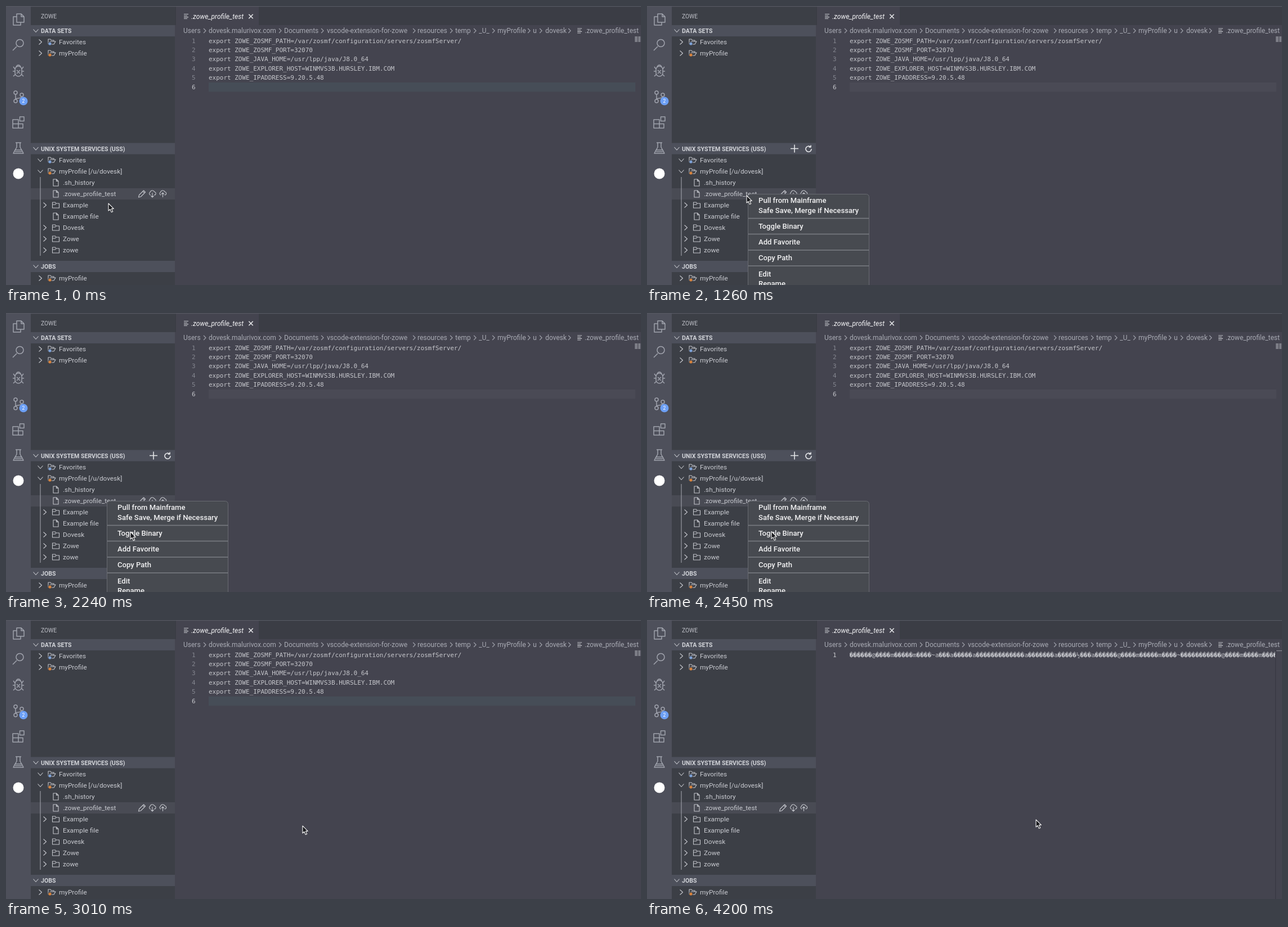
These frames come from a looping animation (1128 px wide and 496 px high, 4270 ms). An HTML page:

```html
<!DOCTYPE html>
<html lang="en">
<head>
<meta charset="utf-8">
<title>Toggle binary</title>
<style>
html, body { margin: 0; height: 100%; overflow: hidden; background: #44444f; }
svg { display: block; width: 1128px; height: 496px; }
text { font: 11.8px Roboto, sans-serif; fill: #c9cbd1; white-space: pre; }
.crumb { font-size: 12px; fill: #a9abb4; }
.tab { font-size: 12px; font-style: italic; fill: #f4f4f6; }
.head { font-size: 10.6px; font-weight: 700; fill: #d2d4d9; }
.title { font-size: 10.3px; fill: #c0c2c9; }
.menu { font-size: 13.1px; font-weight: 500; fill: #f2f2f3; }
.badge { font-size: 8.5px; fill: #fff; text-anchor: middle; }
.code { font: 10.98px "DejaVu Sans Mono", monospace; fill: #c6c7cc; }
.num { fill: #858790; }
path { fill: none; stroke: #c3c5cb; stroke-width: 1.1; stroke-linejoin: round; }
.bar path { stroke: #a0a3ad; stroke-width: 1.5; }
.dim { stroke: #a0a2ab; }
.bright { stroke: #e4e5e8; stroke-width: 1.6; }
</style>
</head>
<body>
<svg viewBox="0 0 1128 496" xmlns="http://www.w3.org/2000/svg"></svg>
<script>
const svg = document.querySelector('svg');
const user = 'dovesk';

const rect = (x, y, w, h, fill, extra = '') =>
  `<rect x="${x}" y="${y}" width="${w}" height="${h}" fill="${fill}" ${extra}/>`;
const text = (x, y, s, cls = '') => `<text x="${x}" y="${y}" class="${cls}">${s}</text>`;
const path = (x, y, d, cls = '') => `<path transform="translate(${x} ${y})" d="${d}" class="${cls}"/>`;
const dot = (x, y, r, fill) => `<circle cx="${x}" cy="${y}" r="${r}" fill="${fill}"/>`;
const group = (id, body) => `<g id="${id}">${body}</g>`;

const RIGHT = 'M-2.5 -4.5L2.5 0L-2.5 4.5', DOWN = 'M-4.5 -2.5L0 2.5L4.5 -2.5';
const FILE = 'M-4.5 -6H1L4.5 -2.5V6H-4.5ZM1 -6V-2.5H4.5';
const FOLDER = 'M-6 5V-5H-1L0.5 -3H6V5ZM-6 -1H-1L0.5 -3';
const OPEN = 'M-6 4V-5H-2L-0.5 -3H4V-1M-2 4H4L7 -1H-2.5L-6 4';
const LINES = 'M-4 -4H4M-4 -1.3H2M-4 1.4H4M-4 4H2';
const CLOUD = 'M-3 3H-3.8A2.8 2.8 0 0 1 -4 -2A4 4 0 0 1 3.6 -2.5A2.8 2.8 0 0 1 4 3H3';

const header = (y, s) =>
  rect(44, y - 10, 256, 20, '#4d505b') + path(53, y, DOWN) + text(62, y + 4, s, 'head');

function profile(y, label, color, chevron) {
  return path(61, y, chevron) + path(81, y, OPEN) + dot(78, y + 3, 3.4, '#3c3f46') +
    dot(78, y + 3, 2.6, color) + text(94, y + 4, label);
}

function entry(y, label, isFolder) {
  return (isFolder ? path(69, y, RIGHT) : '') +
    path(88.5, y, isFolder ? FOLDER : FILE) + text(101, y + 4, label);
}

const BLUE = '#7fa3d8', ORANGE = '#d9853f';

const activityBar = '<g class="bar">' + rect(0, 0, 44, 496, '#4e505b') +
  path(22, 24, 'M-3 -10H5L10 -5V5H-3ZM5 -10V-5H10M-3 -5H-9V10H4V5') +
  path(22, 69, 'M-3 3L-10 10M-4 -3A6.5 6.5 0 1 0 9 -3A6.5 6.5 0 1 0 -4 -3') +
  path(22, 115, 'M-6 -2A6 6 0 0 1 6 -2V4A6 6 0 0 1 -6 4ZM-4 -6A4 4 0 0 1 4 -6M-6 1H-10M6 1H10M-6 -3L-9 -7M6 -3L9 -7M-5 6L-9 10M5 6L9 10M-3 -1L3 5M3 -1L-3 5') +
  path(22, 161, 'M-8 -7A3 3 0 1 0 -2 -7A3 3 0 1 0 -8 -7M-8 8A3 3 0 1 0 -2 8A3 3 0 1 0 -8 8M3 -3A3 3 0 1 0 9 -3A3 3 0 1 0 3 -3M-5 -4V5M6 0C6 3 -1 3 -5 4') +
  dot(31, 169, 7.5, '#6c9ff5') + text(31, 172, '2', 'badge') +
  path(22, 207, 'M-10 -5H0V10H-10ZM-10 2.5H8V10H0M0 2.5H8V10M2.5 -10H10V-2.5H2.5Z') +
  path(22, 253, 'M-5 -10H5M-3 -10V-2L-9 9H9L3 -2V-10M-6 3H6L9 9H-9ZM-6 6H6') +
  dot(22, 298, 9.5, '#fff') + '</g>';

const sideBar = rect(44, 0, 256, 496, '#3c3f46') + text(62, 22, 'ZOWE', 'title') +
  header(44, 'DATA SETS') +
  profile(64, 'Favorites', BLUE, RIGHT) + profile(84, 'myProfile', ORANGE, RIGHT) +
  header(253.5, 'UNIX SYSTEM SERVICES (USS)') +
  group('actions',
    path(262, 253.5, 'M-7 0H7M0 -7V7', 'bright') +
    path(287, 254, 'M3.5 -3.4A5 5 0 1 0 5 0M4 -6.5V-3H0.5', 'bright')) +
  rect(44, 324, 256, 20, '#494b54') +
  group('hover', rect(44, 384, 256, 20, '#43434d')) +
  profile(274, 'Favorites', BLUE, DOWN) + profile(294, `myProfile [/u/${user}]`, ORANGE, DOWN) +
  path(61, 304, 'M0 0V140', 'dim') +
  ['.sh_history', '.zowe_profile_test', 'Example', 'Example file', 'D' + user.slice(1), 'Zowe', 'zowe']
    .map((name, i) => entry(314 + 20 * i, name, i == 2 || i > 3)).join('') +
  path(241.5, 334, 'M-6 6L-5 2L3 -6L6 -3L-2 5ZM1.5 -4.5L4.5 -1.5') +
  path(260, 333, CLOUD + 'M0 -1V7M-2.5 4.5L0 7L2.5 4.5') +
  path(278.5, 333, CLOUD + 'M0 7V-1M-2.5 1.5L0 -1L2.5 1.5') +
  header(463, 'JOBS') + profile(484, 'myProfile', ORANGE, RIGHT);

const crumbs = [[315, 'Users'], [360, user + '.malurivox.com'], [494, 'Documents'],
  [570, 'vscode-extension-for-zowe'], [731, 'resources'], [798, 'temp'], [840, '_U_'],
  [873, 'myProfile'], [936, 'u'], [958, user], [1028, '.zowe_profile_test']];

const codeLine = (i, s) => text(360, 65.5 + 16.45 * i, s, 'code');
const lineNumber = (i, active) => text(330, 65.5 + 16.45 * i, i + 1, active ? 'code' : 'code num');

const script = ['ZOSMF_PATH=/var/zosmf/configuration/servers/zosmfServer/', 'ZOSMF_PORT=32070',
  'JAVA_HOME=/usr/lpp/java/J8.0_64', 'EXPLORER_HOST=WINMVS3B.HURSLEY.IBM.COM', 'IPADDRESS=9.20.5.48'];

// Digits stand for runs of undecodable characters.
const binary = '6@4m5m4~a3a5a99@'.replace('99@', '67a7a5½3a6@') + '4m5m4~56@4m4m4';
const garbled = binary.replace(/\d/g, n => '\ufffd'.repeat(n));

const editor = rect(300, 0, 828, 496, '#44444f') + rect(449, 0, 679, 34, '#3b3d45') +
  rect(300, 0, 2, 34, '#3b3d45') +
  path(320, 18.5, LINES) + text(329, 23, '.zowe_profile_test', 'tab') +
  path(435, 18.5, 'M-3.7 -3.7L3.7 3.7M3.7 -3.7L-3.7 3.7', 'bright') +
  crumbs.map(([x, s]) => text(x, 48, s, 'crumb')).join('') +
  [353, 487, 562, 725, 791, 833, 866, 929, 950, 1001]
    .map(x => path(x, 44, 'M-2 -4L2 0L-2 4', 'dim')).join('') +
  path(1019, 44, LINES) +
  group('plain',
    rect(360, 136, 758, 16.5, '#4a4a55', 'id="line"') +
    script.map((s, i) => lineNumber(i) + codeLine(i, 'export ZOWE_' + s)).join('') +
    lineNumber(5, true) +
    rect(1117, 54, 5, 10, '#7c7d86') + rect(1123, 54, 4, 10, '#7c7d86')) +
  group('binary',
    lineNumber(0, true) +
    `<clipPath id="view"><rect x="360" y="53" width="756.5" height="20"/></clipPath>` +
    `<g clip-path="url(#view)">${codeLine(0, garbled)}</g>` +
    rect(1116, 53, 1.2, 443, '#373842') + rect(1118, 54, 10, 1.2, '#85868e'));

const menuItems = [[350, 'Pull from Mainframe'], [367.5, 'Safe Save, Merge if Necessary'],
  [395.5, 'Toggle Binary'], [424, 'Add Favorite'], [452, 'Copy Path'], [480.5, 'Edit'], [498, 'Rename']];

const menu = group('menu',
  rect(179.5, 334.5, 215, 180, '#474a50', 'rx="5" stroke="#696b72"') +
  [377.5, 405.5, 434, 462].map(y => rect(180, y - 0.8, 214.5, 1.6, '#777a80')).join('') +
  menuItems.map(([y, s]) => text(198, y, s, 'menu')).join(''));

const pointer = group('pointer',
  '<path d="M0 0V13L3 10.3L5.3 15.6L7.7 14.5L5.4 9.4H9.3Z" style="fill:#17181c;stroke:#f4f4f4"/>');

svg.innerHTML = editor + sideBar + activityBar + rect(0, 0, 1128, 1.3, '#555761') + menu + pointer;

const LOOP = 4270, STEP = 70;
const route = [[0, 182, 351], [420, 177, 337], [1400, 177, 337], [1680, 226, 380], [1890, 226, 380],
  [2240, 221, 389], [2590, 221, 388], [3290, 693, 354], [3640, 693, 354], [3920, 691, 355], [LOOP, 691, 355]];

function pointerAt(t) {
  const i = route.findIndex(p => p[0] > t);
  const [t0, x0, y0] = route[i - 1], [t1, x1, y1] = route[i];
  const u = (t - t0) / (t1 - t0), k = u * u * (3 - 2 * u);
  return [x0 + (x1 - x0) * k, y0 + (y1 - y0) * k];
}

const $ = id => document.getElementById(id);
const show = (id, on) => $(id).setAttribute('visibility', on ? 'visible' : 'hidden');

function draw() {
  const t = Math.floor(performance.now() % LOOP / STEP) * STEP;
  const [x, y] = pointerAt(t);
  $('pointer').setAttribute('transform', `translate(${x} ${y})`);
  $('line').setAttribute('fill', t < 630 || t >= 2520 ? '#464d57' : '#4a4a55');
  show('actions', t >= 70 && x < 300);
  show('menu', t >= 840 && t < 2520);
  show('hover', t >= 2520 && t < 2730);
  show('plain', t < 3080);
  show('binary', t >= 3080);
  requestAnimationFrame(draw);
}
draw();
</script>
</body>
</html>
```
